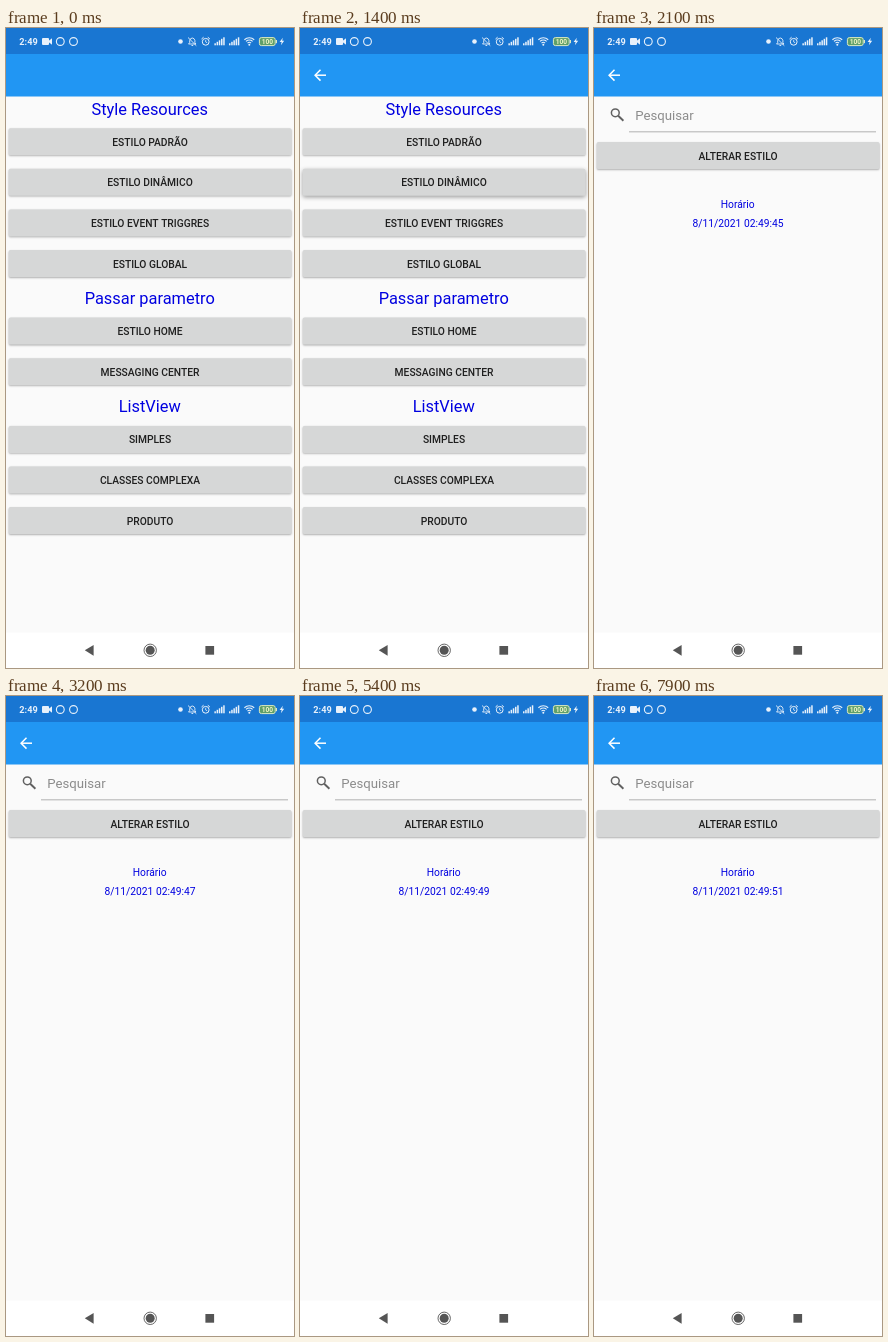
An HTML page with a canvas that plays this animation: 288 by 640 pixels, repeating every 8 s.

```html
<!DOCTYPE html>
<html lang="pt">
<head>
<meta charset="utf-8">
<style>
  html, body { margin: 0; width: 100%; height: 100%; overflow: hidden; background: #fafafa; }
  canvas { display: block; width: 288px; height: 640px; }
</style>
</head>
<body>
<canvas id="stage"></canvas>
<script>
const W = 288, H = 640, LOOP = 8000;
const TAP = 1300, ARROW = 1400, OPEN = 1500, FIRST_TICK = 2200;
const canvas = document.getElementById('stage');
const c = canvas.getContext('2d');
const dpr = window.devicePixelRatio || 1;
canvas.width = W * dpr;
canvas.height = H * dpr;

const INK = '#1f1f1f', BLUE = '#0000e0', ICON = '#e8f1fb';
const headings = [['Style Resources', 86.5], ['Passar parametro', 276], ['ListView', 384]];
const buttons = [
  ['ESTILO PADRÃO', 114], ['ESTILO DINÂMICO', 154.5], ['ESTILO EVENT TRIGGRES', 195.2],
  ['ESTILO GLOBAL', 235.8], ['ESTILO HOME', 303.3], ['MESSAGING CENTER', 344],
  ['SIMPLES', 411.6], ['CLASSES COMPLEXA', 452.2], ['PRODUTO', 492.8]
];

function rect(x, y, w, h, color) {
  c.fillStyle = color;
  c.fillRect(x, y, w, h);
}

function text(str, x, y, size, color, weight = 400, align = 'center') {
  c.font = `${weight} ${size}px Roboto, sans-serif`;
  c.textAlign = align;
  c.fillStyle = color;
  c.fillText(str, x, y);
}

function line(points, color, width) {
  c.beginPath();
  points.forEach(([x, y]) => c.lineTo(x, y));
  c.strokeStyle = color;
  c.lineWidth = width;
  c.stroke();
}

function poly(points, color) {
  c.beginPath();
  points.forEach(([x, y]) => c.lineTo(x, y));
  c.fillStyle = color;
  c.fill();
}

function arc(x, y, r, color, width, from = 0, to = 2 * Math.PI) {
  c.beginPath();
  c.arc(x, y, r, from, to);
  c.strokeStyle = color;
  c.lineWidth = width;
  c.stroke();
}

function disc(x, y, r, color) {
  c.beginPath();
  c.arc(x, y, r, 0, 2 * Math.PI);
  c.fillStyle = color;
  c.fill();
}

function button(label, y, raised) {
  c.save();
  c.shadowColor = raised ? 'rgba(0,0,0,.38)' : 'rgba(0,0,0,.3)';
  c.shadowBlur = (raised ? 4.5 : 2) * dpr;
  c.shadowOffsetY = (raised ? 1.4 : 0.8) * dpr;
  c.beginPath();
  c.roundRect(2.8, y - 13.7, 282.6, 27, 1.5);
  c.fillStyle = '#d6d7d7';
  c.fill();
  c.restore();
  text(label, 144, y + 3.7, 10.27, INK, 500);
}

function signal(x) {
  for (let i = 0; i < 5; i++) {
    const h = 2 + i * 1.5;
    rect(x + i * 2.2, 17.3 - h, 1.5, h, ICON);
  }
}

function statusBar() {
  rect(0, 0, W, 26, '#1976d2');
  text('2:49', 13.3, 17, 9.2, ICON, 700, 'left');
  c.beginPath();
  c.roundRect(36, 10, 7, 7, 1);
  c.fillStyle = ICON;
  c.fill();
  poly([[42.5, 13], [46, 10.2], [46, 16.8], [42.5, 14]], ICON);
  arc(54.3, 13.5, 3.9, ICON, 1.1);
  arc(67.5, 13.5, 3.9, ICON, 1.1);
  disc(174.5, 13.5, 2.3, ICON);

  // muted bell
  line([[182.5, 16], [183.7, 14.8], [183.7, 12.5], [184.6, 10.7], [186.3, 10],
    [188, 10.7], [188.9, 12.5], [188.9, 14.8], [190, 16], [182.5, 16]], ICON, 0.9);
  line([[182, 9.5], [190.3, 17.7]], ICON, 0.9);
  line([[185.5, 17.5], [187.2, 17.5]], ICON, 0.9);

  // alarm clock
  arc(199.7, 13.8, 3.4, ICON, 1);
  line([[199.7, 11.8], [199.7, 14], [201.2, 14.8]], ICON, 0.8);
  line([[195.5, 11], [197.6, 9.2]], ICON, 1);
  line([[203.9, 11], [201.8, 9.2]], ICON, 1);

  signal(208.4);
  signal(223);
  const up = -Math.PI / 2;
  [2.6, 4.9, 7.2].forEach(r => arc(243.3, 17, r, ICON, 1.1, up - 0.75, up + 0.75));
  disc(243.3, 16.8, 1, ICON);

  c.beginPath();
  c.roundRect(253.4, 9.6, 15.8, 8, 2);
  c.fillStyle = '#5f9f6a';
  c.fill();
  c.strokeStyle = '#dcebc0';
  c.lineWidth = 1;
  c.stroke();
  rect(269.9, 12, 1.1, 3.2, '#dcebc0');
  text('100', 261.3, 16, 6.6, '#f4f7c8', 700);
  poly([[276.8, 9.8], [273.6, 14.1], [275.6, 14.1], [274.9, 17.2], [278.2, 12.7], [276.2, 12.7]], ICON);
}

function appBar(withArrow) {
  rect(0, 26, W, 42.5, '#2196f3');
  if (!withArrow) return;
  line([[26, 47.2], [15.6, 47.2]], '#fff', 1.5);
  line([[20.5, 41.8], [15.1, 47.2], [20.5, 52.6]], '#fff', 1.5);
}

function navBar() {
  rect(0, 604.5, W, 35.5, '#fff');
  poly([[78.8, 622.3], [87.6, 617], [87.6, 627.7]], '#555');
  arc(144.2, 622.3, 6.2, '#555', 0.9);
  disc(144.2, 622.3, 4.5, '#555');
  rect(199.4, 618, 8.7, 8.7, '#555');
}

function menuPage(t) {
  headings.forEach(([label, y]) => text(label, 143.7, y, 16.4, BLUE));
  buttons.forEach(([label, y], i) => button(label, y, i === 1 && t >= TAP));
}

function clockPage(t) {
  // opens slightly shrunken, then decelerates to full size
  const p = Math.min(1, (t - OPEN) / 200);
  const scale = 1 - 0.018 * (1 - p) ** 2;
  c.save();
  c.translate(144, 320);
  c.scale(scale, scale);
  c.translate(-144, -320);
  arc(21.3, 84.8, 3.9, '#606060', 1.5);
  line([[24.2, 87.7], [29.4, 92.8]], '#606060', 1.9);
  text('Pesquisar', 41.2, 91.6, 13.2, '#8c8c8c', 400, 'left');
  rect(35, 103.4, 247, 0.9, '#a8a8a8');
  button('ALTERAR ESTILO', 127.8);
  const ticks = Math.max(0, Math.floor((t - FIRST_TICK) / 1000) + 1);
  text('Horário', 143.7, 179.8, 10.27, BLUE);
  text('8/11/2021 02:49:' + (45 + ticks), 144, 198.8, 10.27, BLUE);
  c.restore();
}

function draw(now) {
  const t = now % LOOP;
  c.setTransform(dpr, 0, 0, dpr, 0, 0);
  rect(0, 0, W, H, '#fafafa');
  if (t < OPEN) menuPage(t);
  else clockPage(t);
  appBar(t >= ARROW);
  statusBar();
  navBar();
}

const start = performance.now();
function loop() {
  draw(performance.now() - start);
  requestAnimationFrame(loop);
}
loop();
</script>
</body>
</html>
```
